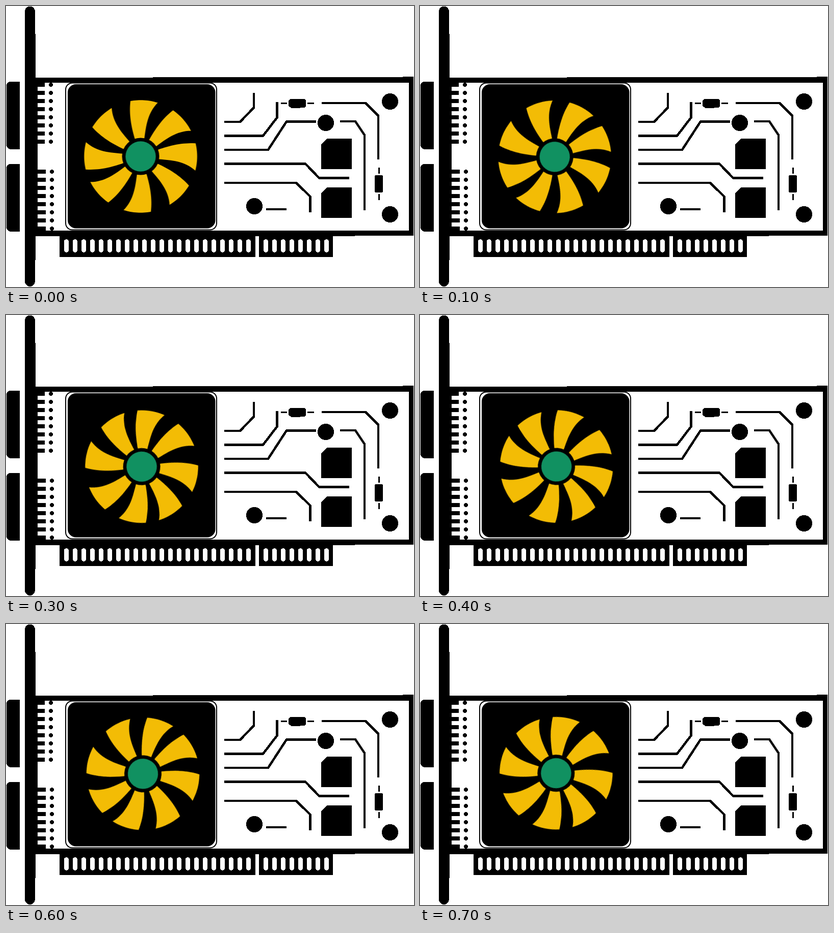
An HTML page that plays this animation: 800 px wide and 553 px high, repeating every 800 ms.

```html
<!DOCTYPE html>
<html lang="en">
<head>
<meta charset="utf-8">
<title>Graphics card fan</title>
<style>
  html, body { margin: 0; width: 100%; height: 100%; overflow: hidden; background: #fff; }
  svg { display: block; width: 100%; height: 100%; }
  #card { shape-rendering: crispEdges; }
  .trace { fill: none; stroke: #000; stroke-width: 4.6; stroke-linejoin: round; }
  .lead { stroke-width: 3; }
</style>
</head>
<body>
<svg viewBox="0 0 800 553" preserveAspectRatio="none">
  <g id="card">
    <!-- bracket and ports -->
    <rect x="37" y="0.5" width="20" height="551.5" rx="10"/>
    <rect x="40" y="55" width="18" height="445"/>
    <path id="port" d="M7 149H27V282H8Q1 280 1 272V156Q2 150 7 149Z"/>
    <use href="#port" y="162"/>

    <!-- board -->
    <path fill-rule="evenodd" d="M56 141H288V140H778V139H799V452H684V453H56Z M62 151H790V442H62Z"/>
    <g id="vents"></g>

    <!-- edge connector -->
    <path d="M105 450H489V494H105ZM496 450H641V494H496Z"/>
    <g id="slots" fill="#fff"></g>

    <!-- traces, leads and parts -->
    <path class="trace" d="M428 228h31l27-28v-29 M428 255.500h76l27.500-36v-31 M428 283h86l36-55.500h58
      M428 310.500h159l27 28h59 M428 348h141l27.500 27v31 M619 191h86l25 25v86 M655 227h30l18 27v148 M510 400h40"/>
    <path class="trace lead" d="M539 191.500h12 M591 191.500h13 M731 318v12 M731 370v12"/>
    <path d="M557 183H585L588 186V198L585 200H579L575 201H560L554 197V186Z"/>
    <rect x="723" y="333" width="16" height="34" rx="2.500"/>
    <path id="chip" d="M629 261H678V321H618V272Z"/>
    <use href="#chip" y="96"/>
    <circle id="pad" cx="753" cy="188" r="16"/>
    <use href="#pad" y="222"/>
    <use href="#pad" x="-126" y="42"/>
    <use href="#pad" x="-266" y="206"/>
  </g>

  <!-- fan housing -->
  <rect x="117" y="151.500" width="296" height="289" rx="13" fill="#fff" stroke="#000" stroke-width="2"/>
  <rect x="121" y="154" width="289.500" height="283.500" rx="16"/>

  <!-- the hub sits off the axis, so the fan wobbles as it spins -->
  <g transform="translate(266.400 296)">
    <g id="fan">
      <g transform="translate(-2.400 0)">
        <g id="blades" fill="#f3bc05"></g>
        <circle r="36.500"/>
        <circle r="29.700" fill="#119161"/>
      </g>
    </g>
  </g>
</svg>
<script>
const NS = "http://www.w3.org/2000/svg";
const RAD = Math.PI / 180;
const $ = id => document.getElementById(id);

function add(id, tag, attrs) {
  const el = document.createElementNS(NS, tag);
  for (const key in attrs) el.setAttribute(key, attrs[key]);
  $(id).appendChild(el);
}

// A bracket tooth and a solder dot per row
function vents(top, toothEnd) {
  for (let i = 0; i < 8; i++) {
    const y = top + i * 16;
    add("vents", "rect", { x: 60, y: y - 4, width: toothEnd - 60, height: 8 });
    add("vents", "circle", { cx: toothEnd + 12, cy: y, r: 4 });
  }
}
vents(155, 76);
vents(326, 78);

function slots(x, count) {
  for (let i = 0; i < count; i++) {
    add("slots", "rect", { x: x + i * 17, y: 459, width: 9, height: 26, rx: 4.5 });
  }
}
slots(114, 22);
slots(505, 8);

// Blade outline in polar form, angles clockwise from straight up
const OUTER = 110.8, INNER = 36, SAMPLES = 16;
const polar = (r, deg) => `${r * Math.sin(deg * RAD)},${-r * Math.cos(deg * RAD)}`;

function bladePoints() {
  const lead = [], rim = [], trail = [];
  for (let i = 0; i <= SAMPLES; i++) {
    const u = i / SAMPLES, r = OUTER + (INNER - OUTER) * u;
    lead.unshift(polar(r, -12 * u + 4 * u * u));
    rim.push(polar(OUTER, 28 * u));
    trail.push(polar(r, 28 - 20 * u + 14 * u * u));
  }
  return [...lead, ...rim, ...trail].join(" ");
}

// Eight blades, spaced slightly unevenly
const points = bladePoints();
for (let i = 0; i < 8; i++) {
  const deg = 45 * i - 11.9 + 2.4 * Math.sin((90 * i + 38) * RAD);
  add("blades", "polygon", { points, transform: `rotate(${deg})` });
}

// The spin speeds up over the loop and is shown in held steps
const STEPS = 8, STEP_MS = 100;
const spin = k => k * (15.6 + k * (4.3 - 0.175 * k));
const frames = Array.from({ length: STEPS + 1 }, (_, k) => ({
  offset: k / STEPS,
  easing: "steps(1, end)",
  transform: `rotate(${-spin(k % STEPS)}deg)`
}));
$("fan").animate(frames, { duration: STEPS * STEP_MS, iterations: Infinity });
</script>
</body>
</html>
```
